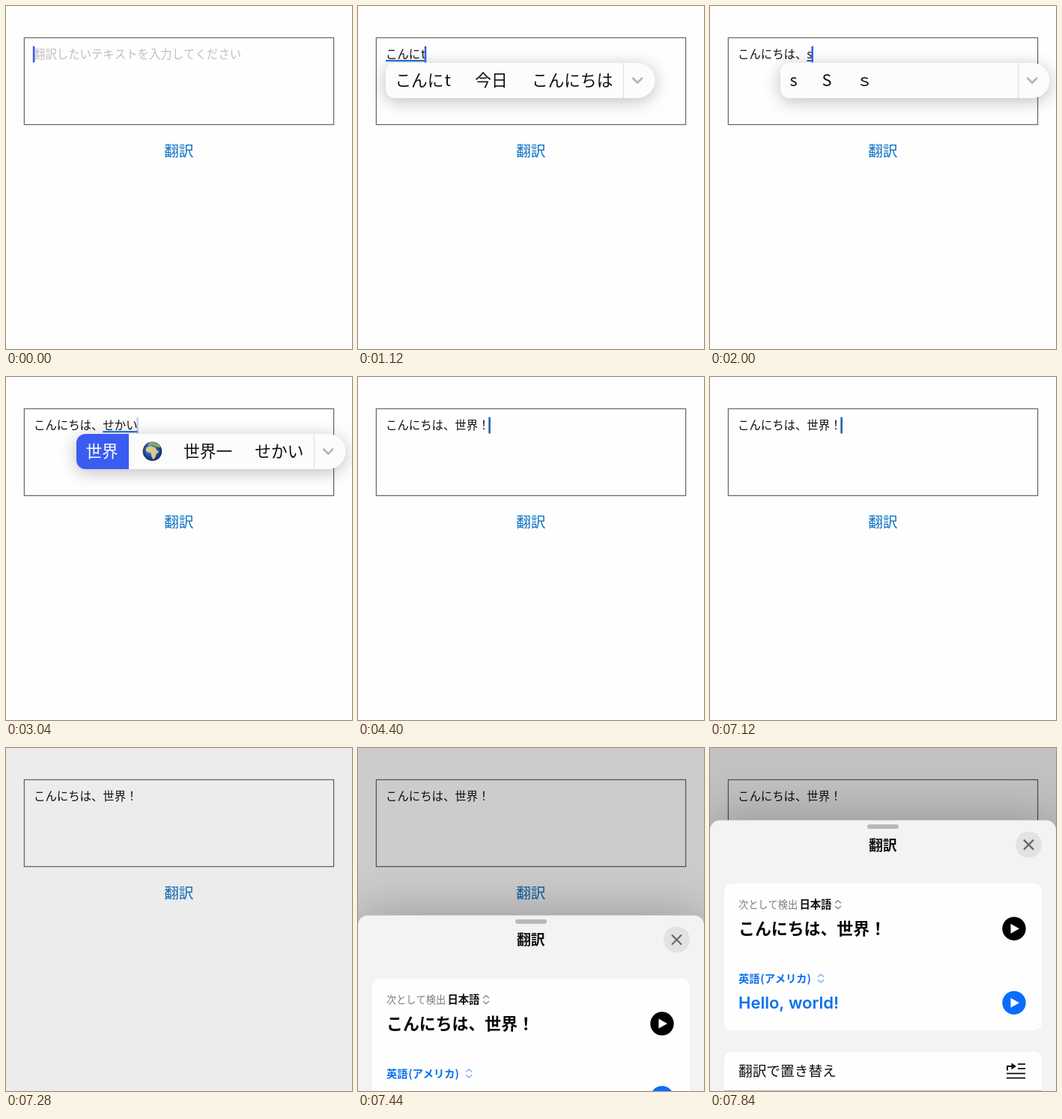
Animation, 462 px wide and 458 px high, one loop 8000 ms. Source, as an HTML page with a canvas:

```html
<!DOCTYPE html>
<html lang="ja">
<head>
<meta charset="utf-8">
<style>
html, body { margin: 0; width: 100%; height: 100%; overflow: hidden; background: #fefefe; }
canvas { display: block; }
</style>
</head>
<body>
<canvas id="stage" width="462" height="458"></canvas>
<script>
const ctx = document.getElementById("stage").getContext("2d");
const W = 462, H = 458, LOOP = 8000, STEP = 80;
const JP = '"Noto Sans CJK JP", "Noto Sans CJK", "Noto Sans", sans-serif';
const LATIN = 'Inter, "Noto Sans CJK JP", sans-serif';
const BODY = 15.4, LEFT = 37, CAND = 21.7;
const SHEET_START = 7200, SHEET_TOP = 95.4, SHEET_TRAVEL = 800;

// time, fixed text, text being composed, candidates
// (a hair space parts kana from Latin letters)
const KEYS = [
  [0, "", ""],
  [240, "", "k", ["k", "K", "ｋ"]],
  [480, "", "こ", ["こ", "この", "これ", "ここ"]],
  [640, "", "こ\u200an", ["こ\u200an", "この", "こんな"]],
  [800, "", "こん", ["こん", "今", "今回"]],
  [960, "", "こん\u200an", ["こん\u200an", "こんな", "今年"]],
  [1040, "", "こんに", ["こんに", "今日", "こんにちは"]],
  [1120, "", "こんに\u200at", ["こんに\u200at", "今日", "こんにちは"]],
  [1200, "", "こんにち", ["こんにち", "今日", "こんにちは"]],
  [1280, "", "こんにち\u200ah", ["こんにち\u200ah", "こんにちは"]],
  [1360, "", "こんにちは", ["こんにちは", "今日は"]],
  [1520, "", "こんにちは、", ["こんにちは、", "今日は、"]],
  [1760, "こんにちは、", ""],
  [1920, "こんにちは、", "s", ["s", "S", "ｓ"]],
  [2080, "こんにちは、", "せ", ["せ", "背", "世", "瀬"]],
  [2240, "こんにちは、", "せ\u200ak", ["せ\u200ak", "世界", "せっかく"]],
  [2320, "こんにちは、", "せか", ["世界", "せかい", "せか"]],
  [2400, "こんにちは、", "せかい", ["世界", "globe", "世界一", "せかい"]],
  [3600, "こんにちは、世界", ""],
  [3760, "こんにちは、世界", "！", ["！", "!", "!!"]],
  [4000, "こんにちは、世界！", ""]
];
const SELECT_TIME = 2800, SELECT_END = 3600;

function setFont(size, weight = 400, family = JP) {
  ctx.font = `${weight} ${size}px ${family}`;
}

// Draws text whose em box is centred on cy
function label(str, x, cy, size, color, weight = 400, family = JP) {
  setFont(size, weight, family);
  ctx.fillStyle = color;
  ctx.fillText(str, x, cy + size * 0.38);
}

function box(x, y, w, h, r, color) {
  ctx.fillStyle = color;
  ctx.beginPath();
  ctx.roundRect(x, y, w, h, r);
  ctx.fill();
}

function disc(x, y, r, color) {
  ctx.fillStyle = color;
  ctx.beginPath();
  ctx.arc(x, y, r, 0, Math.PI * 2);
  ctx.fill();
}

function path(points) {
  ctx.beginPath();
  points.forEach(([x, y]) => ctx.lineTo(x, y));
}

function line(points, color, width) {
  path(points);
  ctx.strokeStyle = color;
  ctx.lineWidth = width;
  ctx.stroke();
}

function withShadow(color, blur, dy, draw) {
  ctx.save();
  ctx.shadowColor = color;
  ctx.shadowBlur = blur;
  ctx.shadowOffsetY = dy;
  draw();
  ctx.restore();
}

function globe(x, y) {
  const sea = ctx.createRadialGradient(x - 4, y - 5, 1, x, y, 13);
  sea.addColorStop(0, "#5d8fd8");
  sea.addColorStop(0.6, "#2856a8");
  sea.addColorStop(1, "#102c68");
  ctx.save();
  disc(x, y, 12.8, sea);
  ctx.clip();
  ctx.translate(x, y);
  ctx.fillStyle = "#8fa565";
  path([[-6, -10], [-1, -13], [9, -10], [11, -5], [5, -6], [1, -8], [-5, -7]]);
  ctx.fill();
  ctx.fillStyle = "#d8c990";
  path([[-8, -5], [-3, -7], [4, -5], [6, -1], [9, 0], [5, 4], [4, 8], [1, 11], [-1, 7], [-2, 2], [-7, 1], [-9, -2]]);
  ctx.fill();
  ctx.restore();
}

function popup(x, items, selected) {
  const y = 76, w = 359.5, h = 47, radii = [12, 23.5, 23.5, 12];
  withShadow("rgba(0,0,0,.26)", 22, 4, () => box(x, y, w, h, radii, "#fcfcfc"));
  setFont(CAND);
  const widths = items.map(s => s === "globe" ? 27 : ctx.measureText(s).width);
  const total = widths.reduce((a, b) => a + b, 0);
  const gap = Math.min(33, (291 - total) / (items.length - 1));
  if (selected) box(x, y, 70, h, [12, 0, 0, 12], "#3a5cf0");
  let cx = x + 12.4;
  items.forEach((s, i) => {
    if (s === "globe") globe(cx + 15.5, 99.2);
    else label(s, cx, 98.6, CAND, selected && i === 0 ? "#fff" : "#111");
    cx += widths[i] + gap;
  });
  line([[x + 317.5, y], [x + 317.5, y + h]], "#dcdcdc", 1);
  ctx.lineCap = ctx.lineJoin = "round";
  line([[x + 330.2, 96.5], [x + 336.2, 102.5], [x + 342.2, 96.5]], "#b4b4b4", 2.6);
  ctx.lineCap = "butt";
  ctx.lineJoin = "miter";
}

function caretAlpha(idle) {
  if (idle < 640) return 1;
  const p = (idle - 640) % 960;
  if (p < 80) return 0.3;
  if (p < 160) return 0.1;
  if (p < 400) return 0;
  return p < 480 ? 0.25 : 1;
}

function editor(t) {
  const [since, fixed, composing, items] = KEYS.findLast(k => k[0] <= t);
  ctx.strokeStyle = "#6c6c6c";
  ctx.lineWidth = 1.3;
  ctx.strokeRect(24.4, 42.4, 413.2, 116);
  label("翻訳", 211.2, 193.5, 19.6, "#0b70c6");

  const text = fixed + composing;
  if (text) label(text, LEFT, 64.3, BODY, "#111");
  else label("翻訳したいテキストを入力してください", LEFT, 64.3, BODY, "#bebebe");

  setFont(BODY);
  const start = LEFT + ctx.measureText(fixed).width;
  const end = LEFT + ctx.measureText(text).width;
  if (composing) {
    box(start, 72, end - start, 2.2, 0, "#2176e0");
    popup(Math.min(start, 94), items, t >= SELECT_TIME && t < SELECT_END);
  }
  if (t <= SHEET_START) {
    ctx.globalAlpha = caretAlpha(t - since);
    box(end - 1.2, 53.5, 2.6, 22, 1, composing || !text ? "#3c5fe0" : "#1f62b4");
    ctx.globalAlpha = 1;
  }
}

function playButton(y, color) {
  disc(406, y, 15.7, color);
  ctx.fillStyle = "#fff";
  path([[401.5, y - 6.5], [413, y], [401.5, y + 6.5]]);
  ctx.fill();
}

function upDown(x, y, color) {
  for (const d of [-1, 1])
    line([[x - 4, y + 2 * d], [x, y + 5.5 * d], [x + 4, y + 2 * d]], color, 1.4);
}

function replaceIcon() {
  const ink = "#111";
  line([[397, 431], [397, 425.5], [404, 425.5]], ink, 2);
  ctx.fillStyle = ink;
  path([[402.5, 421], [409, 425.5], [402.5, 430]]);
  ctx.fill();
  for (const [x, y] of [[411, 422.5], [411, 428.5], [396, 435], [396, 441]])
    line([[x, y], [421, y]], ink, 1.8);
}

// Laid out at its resting position, then shifted down by dy
function sheet(dy) {
  const blue = "#0a70ee";
  ctx.save();
  ctx.translate(0, dy);
  withShadow("rgba(0,0,0,.28)", 70, 0, () => box(0, 97, W, 900, [13, 13, 0, 0], "#f2f4f3"));
  box(210, 102.3, 42, 6, 3, "#b7b9b8");
  label("翻訳", 212, 129.8, 18.8, "#111", 700);
  disc(425.5, 129.5, 17.5, "#e1e3e2");
  line([[419, 123], [432, 136]], "#666", 2.2);
  line([[432, 123], [419, 136]], "#666", 2.2);

  box(19, 181.4, 424, 196, 10, "#fefefe");
  label("次として検出", 38, 209.5, 13.2, "#7c7c7c");
  label("日本語", 119.5, 209.3, 14.3, "#111", 700);
  upDown(171, 209.5, "#8c8c8c");
  label("こんにちは、世界！", 38, 241.4, 21.9, "#080808", 700);
  playButton(241.6, "#000");
  label("英語\u200a(アメリカ)", 38, 307.7, 14.2, blue, 700);
  upDown(148, 308, "#7eb0ee");
  label("Hello, world!", 38, 340, 22, blue, 600, LATIN);
  playButton(340.6, "#0a6cff");

  box(19, 406.2, 424, 200, 10, "#fefefe");
  label("翻訳で置き替え", 38, 431.7, 18.7, "#111");
  replaceIcon();
  line([[19, 457.9], [443, 457.9]], "#b9b9bb", 1);
  ctx.restore();
}

function draw(t) {
  ctx.fillStyle = "#fefefe";
  ctx.fillRect(0, 0, W, H);
  editor(t);
  if (t <= SHEET_START) return;
  // Critically damped spring
  const s = (t - SHEET_START) / 1000 * 13.7;
  const left = (1 + s) * Math.exp(-s);
  ctx.fillStyle = `rgba(0,0,0,${0.235 * (1 - left)})`;
  ctx.fillRect(0, 0, W, H);
  sheet(SHEET_TRAVEL * left + SHEET_TOP - 97);
}

const begin = performance.now();
function tick() {
  const t = (performance.now() - begin) % LOOP;
  draw(Math.floor(t / STEP) * STEP);
  requestAnimationFrame(tick);
}
tick();
</script>
</body>
</html>
```
